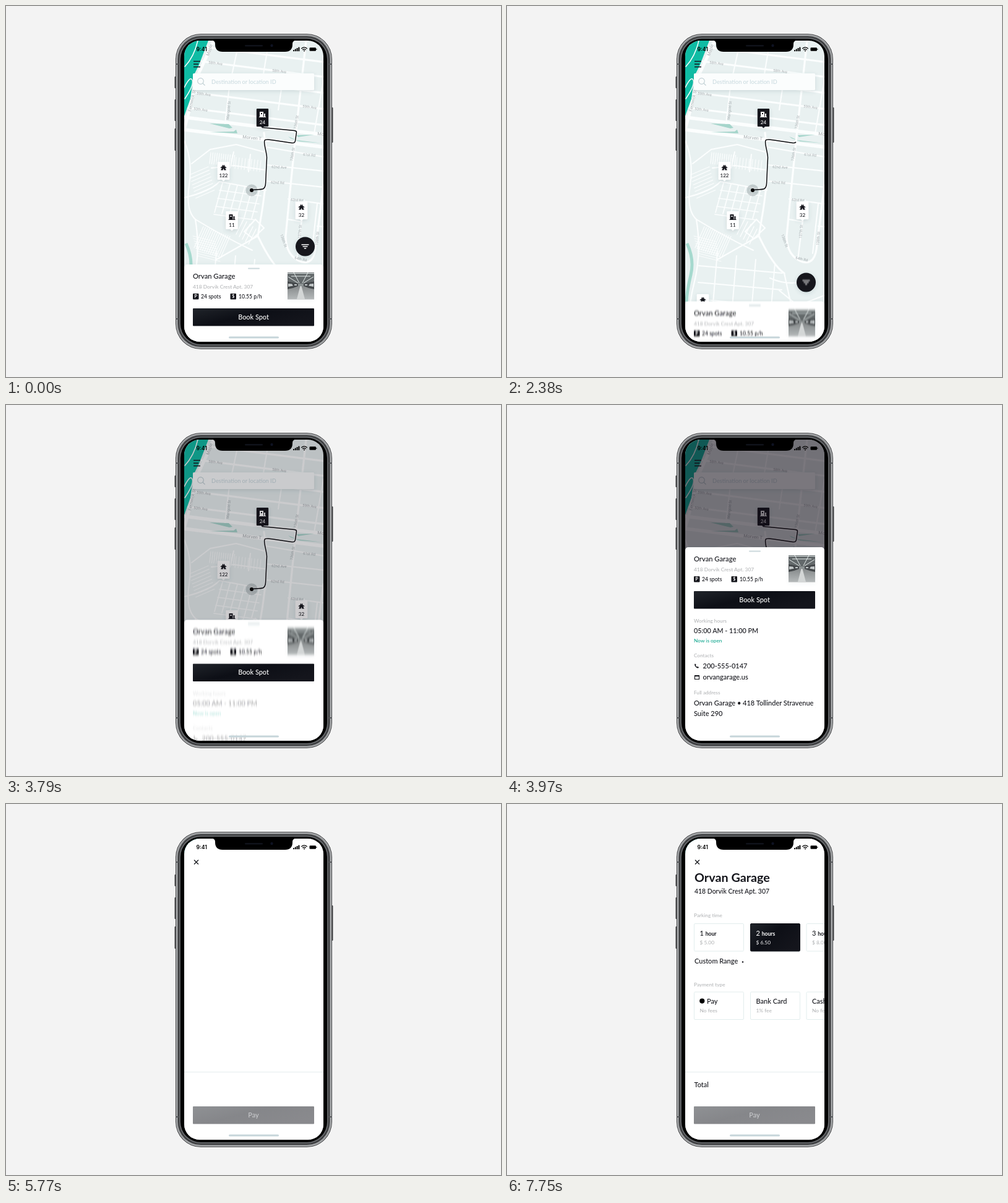
An HTML page that plays this animation: 800x600 px, repeating every 8 s.

```html
<!DOCTYPE html>
<html lang="en">
<head>
<meta charset="utf-8">
<title>Parking app</title>
<style>
html, body { margin: 0; width: 100%; height: 100%; overflow: hidden; background: #f3f3f3; }
svg { display: block; width: 800px; height: 600px; font-family: Lato, sans-serif; font-weight: 500; }
.road { fill: none; stroke: #fcfefe; stroke-linecap: round; stroke-linejoin: round; }
.map-label { font-family: Roboto, sans-serif; font-weight: 400; fill: #a6adb0; }
</style>
</head>
<body>
<script>
const INK = '#15161c', GREY = '#b4b6b8';
const NAME = 'Orvan Garage', ADDRESS = '418 Dorvik Crest Apt. 307';

// ---- markup helpers ----
const text = (s, x, y, size, fill = INK, more = '') =>
  `<text x="${x}" y="${y}" font-size="${size}" fill="${fill}" ${more}>${s}</text>`;
const rect = (x, y, w, h, fill, r = 0, more = '') =>
  `<rect x="${x}" y="${y}" width="${w}" height="${h}" rx="${r}" fill="${fill}" ${more}/>`;
const road = (d, w = 2.2) => `<path class="road" d="${d}" stroke-width="${w}"/>`;
const hatch = (n, x, y, dx, dy, lx, ly, w = 1.2) =>
  road(Array.from({ length: n }, (_, i) => `M${x + i * dx} ${y + i * dy}l${lx} ${ly}`).join(''), w);
const bold = 'font-weight="700"';
const middle = 'text-anchor="middle"';

// ---- map ----
const labels = [
  ['58th Ave', 327, 93, 7], ['58th Ave', 430, 106, 7], ['59th Ave', 308, 143, 7],
  ['59th Ave', 479, 164, 7], ['50th Ave', 303, 168, 7], ['Marigold St', 360, 184, -84],
  ['136th St', 469, 199, -80], ['136th St', 463, 251, -80], ['61st Rd', 480, 242, 5],
  ['62nd Ave', 429, 262, 3], ['62nd Rd', 428, 287, 3], ['63rd Rd', 460, 315, 5],
  ['136th St', 443, 370, 70], ['137th St', 476, 376, -85], ['138th St', 504, 387, -85],
  ['64th Rd', 466, 409, 12]
];
const mapLabel = ([s, x, y, a], size = 5.9) =>
  `<text class="map-label" font-size="${size}" transform="translate(${x} ${y}) rotate(${a})">${s}</text>`;

const map = () => rect(288, 56, 225, 487, '#e9f1f1') +
  [62, 86, 112, 138, 164].map(y => road(`M288 ${y}l225 28.5`, 3)).join('') +
  '<path d="M288 56H327L312 95 303 113 298 150 288 178Z" fill="#0fbca4"/>' +
  road('M310 56Q304 82 289 98M288 132Q298 112 301 120T289 150', 1.5) +
  road('M336 56L310 112 301 150 289 196', 5) +
  road('M288 180l225 28M288 200l225 28', 5.5) +
  '<g fill="#a5d5cb"><path d="M329 190L360 191 366 197 361 198ZM329 204L374 206 372 200 368 203ZM470 209L498 208 472 212ZM456 211L470 217 513 222 474 219 460 214Z"/></g>' +
  road('M377 56L361 130 354 190M425 56L416 110M446 128L440 168M513 120L498 206', 2) +
  road('M485 56L469 200 458 310 452 372Q452 405 478 414Q499 419 501 385L513 290', 3.2) +
  road('M420 228L513 244M421 257L513 267M421 283L513 293M456 312L513 320M482 314L470 410M503 320L494 400M456 345L478 349M503 356L513 357') +
  road('M417 205C424 260 420 290 414 330L407 372Q430 420 448 432', 3) +
  road('M288 218Q302 250 296 290T306 345Q350 372 398 395M300 255L330 232 372 224 417 236M332 262L368 258 418 265M345 284L420 298M288 310Q330 300 345 284M368 236L362 262M395 240L392 268', 2) +
  hatch(12, 331, 237, 3.5, .4, -2, 18) +
  hatch(8, 297, 273, 1.4, 5.4, 30, -13) +
  hatch(9, 372, 245, 5, .6, -2, 18, 1) +
  hatch(6, 350, 286, 12, 2, -13, 48, 1.7) +
  hatch(4, 345, 298, -3, 13, 67, 9, 1.7) +
  hatch(14, 319, 357, 3.3, 1.2, -15, 34) +
  hatch(9, 302, 372, 1, 4, 36, 9, 1) +
  hatch(5, 384, 345, 5, 4, -12, 24, 1.5) +
  hatch(4, 340, 398, 31, 6, -12, 142, 1.9) +
  hatch(5, 310, 420, -1, 27, 135, 12, 1.9) +
  road('M306 345Q315 400 302 450T300 543M407 372L340 410M385 365l18-20 14 14-18 17ZM425 440Q460 456 496 440M448 432L472 543M513 468L430 500M440 460L513 520') +
  '<path d="M291 384Q303 410 297 435T290 478" fill="none" stroke="#a5d9ce" stroke-width="5"/>' +
  labels.map(l => mapLabel(l)).join('') +
  mapLabel(['Fernwick St', 299, 171, -78], 7) + mapLabel(['Maple', 328, 81, -72], 7) +
  mapLabel(['Mo', 503, 209, 6], 7.4) +
  mapLabel(['Morven T<tspan id="tail">arling Expy</tspan>', 382, 214, 6], 7.4);

const search = rect(302, 109, 196, 27, '#fbfdfd', 1.5, 'filter="url(#soft)"') +
  '<g fill="none" stroke="#c3d2d6" stroke-width="1.2"><circle cx="314.5" cy="121.5" r="4.8"/><path d="M318 125l3.5 3.5"/></g>' +
  text('Destination or location ID', 332, 125.5, 9.2, '#cbdbe0') +
  `<path d="M303 89.5h11M303 94h8M303 98.5h11" stroke="${INK}" stroke-width="1.4"/>`;

// ---- pins ----
const icons = {
  garage: 'M-5.5 14V13H-4.5V5H1.5V13H2.5V8H4.5V13H5.5V14ZM-2.5 7V9H-.5V7Z',
  road: 'M-1.6 5H-.5V6.5H.5V5H1.6L2 7.3Q4.2 8 5.2 9.8H2.6L4.4 13.5H.7V11.5H-.7V13.5H-4.4L-2.6 9.8H-5.2Q-4.2 8 -2 7.3Z'
};
const pins = [
  [414.5, 166, 24, 'garage'], [351.5, 252, 122, 'road'], [365, 332, 11, 'garage'],
  [477.5, 316, 32, 'road'], [316.5, 466, 3, 'road']
];
const pinFace = (n, icon, bg, fg) =>
  `<path d="M-8.5 0H8.5Q9.7 0 9.7 1.2V28Q9.7 29 8.5 29H2.5L0 31.5 -2.5 29H-8.5Q-9.7 29 -9.7 28V1.2Q-9.7 0 -8.5 0Z" fill="${bg}"/>` +
  `<path d="${icons[icon]}" fill="${fg}" fill-rule="evenodd"/>` + text(n, 0, 24.5, 8, fg, middle);
const pin = ([x, y, n, icon], i) =>
  `<g class="pin"><g transform="translate(${x} ${y})"><g filter="url(#soft)">${pinFace(n, icon, '#fff', INK)}</g>` +
  (i ? '' : `<g id="picked">${pinFace(n, icon, INK, '#fff')}</g>`) + '</g></g>';

// ---- bottom sheet, top edge at y = 0 ----
const badge = (s, x) => rect(x, 47, 9.5, 9.5, INK, 1) + text(s, x + 4.75, 54.2, 7, '#fff', `${middle} ${bold}`);
const photo = `<g transform="translate(455 13)">
  <rect y="2" width="43" height="42" fill="#8a8f92" opacity=".35" filter="url(#soft)"/>
  <rect width="43" height="43" fill="url(#floor)"/>
  <path d="M0 0H43V13L26 20H17L0 13Z" fill="#63696b"/>
  <path d="M1 7L17 17M42 7L26 17M10 0L19 17M33 0L24 17M0 1.5H43M6 6H37" stroke="#e3eae9" stroke-width="1"/>
  <path d="M0 14L17 18V22L9 25 0 27ZM43 14L26 18V22L34 25 43 27Z" fill="#45494c"/>
  <path d="M1 18l6 .5 2 3-8 1.5ZM42 18l-6 .5-2 3 8 1.5ZM11 19h4v2h-4ZM28 19h4v2h-4Z" fill="#c3c8c9"/>
  <path d="M17 18H26V22H17Z" fill="#8b9192"/>
  <path d="M20.5 22H22.5L28 43H15Z" fill="#d3d6d6"/></g>`;
const details =
  text('Working hours', 302, 121.5, 8.2, GREY) + text('05:00 AM - 11:00 PM', 302, 139, 10.8) +
  text('Now is open', 302, 153.5, 8.3, '#10a68e') +
  text('Contacts', 302, 178, 8.2, GREY) + text('200-555-0147', 316.5, 195.5, 11) +
  `<path d="M304 188.3q-1.6 1-.4 3.4t3.6 3.6q2 .8 2.9-.8l-1.9-1.7-1.2.8q-1.5-.8-2.1-2.3l.9-1Z" fill="${INK}"/>` +
  text('orvangarage.us', 316.5, 213.5, 11) +
  `<path d="M303.5 207.5h7v6h-7Zm0 .8h7" fill="none" stroke="${INK}" stroke-width="1.2"/>` +
  text('Full address', 302, 238, 8.2, GREY) +
  text(`${NAME} • 418 Tollinder Stravenue`, 302, 256, 11) + text('Suite 290', 302, 273, 11);
const sheet = `<g id="sheet">${rect(288, 0, 225, 520, '#fff', 5, 'filter="url(#soft)"')}<g id="info">
  ${rect(391, 5.5, 19, 2, '#cbd8dc', 1)}${text(NAME, 302, 23.3, 11.2)}${text(ADDRESS, 302, 38.5, 8.4, GREY)}
  ${badge('P', 302)}${text('24 spots', 315, 55, 8.6)}${badge('$', 362.5)}${text('10.55 p/h', 376, 55, 8.6)}
  ${photo}<g id="details">${details}</g></g></g>`;
const button = `<g id="button"><g id="plate">${rect(302, 0, 196, 28.5, 'url(#dark)', 1)}</g>
  ${text('Book Spot', 400, 18, 10.9, '#fff', `${middle} id="book"`)}
  ${text('Pay', 400, 18, 10.9, '#c9cacd', `${middle} id="pay"`)}</g>`;

// ---- payment page ----
const card = (x, y, head, sub, tone) => {
  const [bg, fg, low, line] = tone || ['#fff', INK, GREY, '#e2eded'];
  return rect(x + .5, y + .5, 80, 44.5, bg, 1.5, `stroke="${line}"`) +
    text(head, x + 9.5, y + 19.5, 11, fg) + text(sub, x + 9.5, y + 33.5, 8.4, low);
};
const hours = (n, s) => `${n} <tspan font-size="8.6" ${bold}>${s}</tspan>`;
const rows = [
  text(NAME, 303, 126, 19.8, INK, bold),
  text(ADDRESS, 303, 144.5, 10.45),
  text('Parking time', 302, 183, 8.3, GREY),
  card(302, 193, hours(1, 'hour'), '$ 5.00'),
  card(393, 193, hours(2, 'hours'), '$ 6.50') +
    `<g id="chosen">${card(393, 193, hours(2, 'hours'), '$ 6.50', ['url(#dark)', '#fff', '#e4e4e6', INK])}</g>`,
  card(483.5, 193, hours(3, 'hours'), '$ 8.00'),
  text('Custom Range', 303, 258, 11) + `<circle cx="381" cy="255.5" r="1.2" fill="${INK}"/>`,
  text('Payment type', 302, 294.5, 8.3, GREY),
  card(302, 303.5, '', 'No fees') + `<circle cx="315.3" cy="318.6" r="4.1" fill="#000"/>` + text('Pay', 323, 322.8, 11),
  card(393, 303.5, 'Bank Card', '1% fee') + card(483.5, 303.5, 'Cash', 'No fees'),
  text('Total', 302.5, 458, 11)
];
const page = `<g id="frame"><path d="M288 433.5H513" stroke="#e5eced"/>
  <path d="M304 90.5l7 7m0-7l-7 7" stroke="${INK}" stroke-width="1.3"/></g>` +
  rows.map(r => `<g class="row">${r}</g>`).join('');

// ---- phone: nested rings from the steel edge to the black bezel ----
const ring = (inset, fill) =>
  rect(274 + inset, 45 + inset, 253 - 2 * inset, 510 - 2 * inset, fill, 41 - inset);
const body = [[272.5, 114, 19], [272.5, 151, 35], [272.5, 198, 36], [525.5, 164, 57]]
    .map(([x, y, h]) => rect(x, y, 3, h, '#4a4b4d', 1)).join('') +
  ring(0, '#3a3b3d') + ring(1, '#c4c6c8') + ring(2, '#8b8d8f') + ring(4, '#2c2d2f') +
  ring(5.5, '#606265') + ring(8, '#000') +
  '<path d="M274 94h5M522 94h5M274 506h5M522 506h5" stroke="#55575a" stroke-width="2"/>';
const status = `<path d="M333 55.5Q338 56.5 338 61V62Q338 74 350 74H451Q463 74 463 62V61Q463 56.5 468 55.5Z"/>
  ${rect(386, 63, 29, 2.6, '#10121a', 1.3)}<circle cx="429.5" cy="64" r="2.2" fill="#0e1222"/>
  <text x="307.5" y="73.4" font-size="8.7" font-weight="600" font-family="Inter, sans-serif">9:41</text>
  ${[0, 1, 2, 3].map(i => rect(464 + i * 2.8, 71 - i * 1.5, 2, 2.2 + i * 1.5, '#000', .4)).join('')}
  <g fill="none" stroke="#000" stroke-width="1.3"><path d="M477.3 69q4.7-4.2 9.4 0M479.2 71q2.8-2.4 5.6 0"/></g>
  <circle cx="482" cy="72.6" r="1"/>${rect(490.5, 67.2, 10.5, 5.6, '#000', 1.3)}${rect(501.4, 69, 1, 2, '#000', .4)}
  ${rect(360, 534.5, 81, 3, '#c6d5da', 1.5)}`;

const routePath = 'M397 298C404 296 412 297.5 416 295.5C420 293 419.5 287 420 278L421.5 245C421 235 416 222 418 217.5' +
  'C419 215 425 216 430 216.8L462 221.5Q467 222 467.5 218L469.5 204Q469.5 202 466 201.5L414.5 196.5';

document.body.innerHTML = `<svg viewBox="0 0 800 600"><defs>
  <clipPath id="screen"><rect x="288" y="56" width="225" height="487" rx="25"/></clipPath>
  <linearGradient id="dark" x2="1" y2=".6"><stop stop-color="#20242a"/><stop offset=".5" stop-color="#0d0f16"/><stop offset="1" stop-color="#14151c"/></linearGradient>
  <linearGradient id="floor" x2="0" y2="1"><stop offset=".5" stop-color="#85898a"/><stop offset="1" stop-color="#b4b8b9"/></linearGradient>
  <filter id="soft" x="-40%" y="-40%" width="180%" height="180%"><feDropShadow dx="0" dy="2" stdDeviation="3" flood-color="#3c5a60" flood-opacity=".16"/></filter>
  <filter id="blur" filterUnits="userSpaceOnUse" x="270" y="-30" width="260" height="600"><feGaussianBlur id="smear" stdDeviation="0"/></filter>
  <filter id="iconBlur" filterUnits="userSpaceOnUse" x="-20" y="-20" width="40" height="40"><feGaussianBlur id="iconSmear" stdDeviation="0"/></filter>
  </defs>${rect(0, 0, 800, 600, '#f3f3f3')}${body}
  <g clip-path="url(#screen)">${map()}${search}
  <circle cx="397" cy="298" r="9.5" fill="#8b9698" opacity=".42"/><circle cx="397" cy="298" r="3" fill="#000"/>
  <path id="route" d="${routePath}" pathLength="1" fill="none" stroke="#08090c" stroke-width="1.5"/>
  ${pins.map(pin).join('')}
  <g id="fab"><circle r="15.5" fill="${INK}" filter="url(#soft)"/><path id="lines" d="M-6 -3H6M-4 0H4M-1.7 3H1.7" stroke="#fff" stroke-width="1.3"/></g>
  ${rect(288, 56, 225, 487, '#120a14', 0, 'id="shade"')}${sheet}${page}${button}</g>
  ${status}</svg>`;

// ---- motion ----
const el = id => document.getElementById(id);
const all = c => [...document.querySelectorAll(c)];
const set = (node, attrs) => Object.entries(attrs).forEach(([k, v]) => node.setAttribute(k, v));
const span = (t, a, b) => Math.min(1, Math.max(0, (t - a) / (b - a)));
const inOut = p => p < .5 ? 4 * p ** 3 : 1 - (2 - 2 * p) ** 3 / 2;
const out = p => 1 - (1 - p) ** 3;
const move = (t, a, b) => inOut(span(t, a, b));

const LOOP = 8000, STEP = 30;
const pinNodes = all('.pin'), rowNodes = all('.row');
const sheetY = t => 545 - 127 * move(t, 2130, 2620) - 188 * move(t, 3640, 3970) - 174 * move(t, 5500, 5770);
const fabY = t => 492 - 103 * move(t, 2160, 2620);
const speed = (f, t) => Math.abs(f(t) - f(t - STEP));

function smear(node, blurId, filter, v) {
  set(el(blurId), { stdDeviation: `${v * .02} ${v * .065}` });
  if (v > .5) set(node, { filter: `url(#${filter})` });
  else node.removeAttribute('filter');
}

function draw(t) {
  const grow = out(span(t, 310, 550));
  set(el('fab'), { transform: `translate(483.5 ${fabY(t)}) scale(${grow})` });
  smear(el('lines'), 'iconSmear', 'iconBlur', speed(fabY, t));

  pinNodes.forEach((node, i) => {
    const p = out(span(t, 670 + i * 52, 912 + i * 52));
    set(node, { transform: `translate(0 ${-7 * (1 - p)})`, opacity: p });
  });
  set(el('picked'), { opacity: span(t, 1870, 1990) });

  const route = (1 - Math.cos(Math.PI * span(t, 2000, 2620))) / 2;
  set(el('route'), { 'stroke-dasharray': `${route} 2`, opacity: route > 0 ? 1 : 0 });
  set(el('tail'), { 'fill-opacity': 1 - span(route, .4, .65) });

  const open = move(t, 3640, 3970), full = move(t, 5500, 5770), y = sheetY(t);
  set(el('shade'), { opacity: .55 * open });
  set(el('sheet'), { transform: `translate(0 ${y})` });
  smear(el('info'), 'smear', 'blur', speed(sheetY, t));
  set(el('info'), { opacity: 1 - span(t, 5500, 5620) });
  set(el('details'), { opacity: open });

  set(el('button'), { transform: `translate(0 ${(y + 71) * (1 - full) + 489 * full})` });
  set(el('plate'), { opacity: 1 - .5 * full });
  set(el('book'), { opacity: 1 - span(full, 0, .5) });
  set(el('pay'), { opacity: span(full, .5, 1) });
  set(el('frame'), { opacity: span(t, 5590, 5740) });

  rowNodes.forEach((node, i) => {
    const p = out(span(t, 5790 + i * 51, 6190 + i * 51));
    set(node, { transform: `translate(0 ${14 * (1 - p)})`, opacity: p });
  });
  set(el('chosen'), { opacity: span(t, 7570, 7750) });
}

const start = performance.now();
function tick() {
  const t = (performance.now() - start) % LOOP;
  // The loop opens on the raised sheet, then cuts to the bare map.
  draw(t < 100 ? 3600 : 100 + Math.floor((t - 100) / STEP) * STEP);
  requestAnimationFrame(tick);
}
tick();
</script>
</body>
</html>
```
